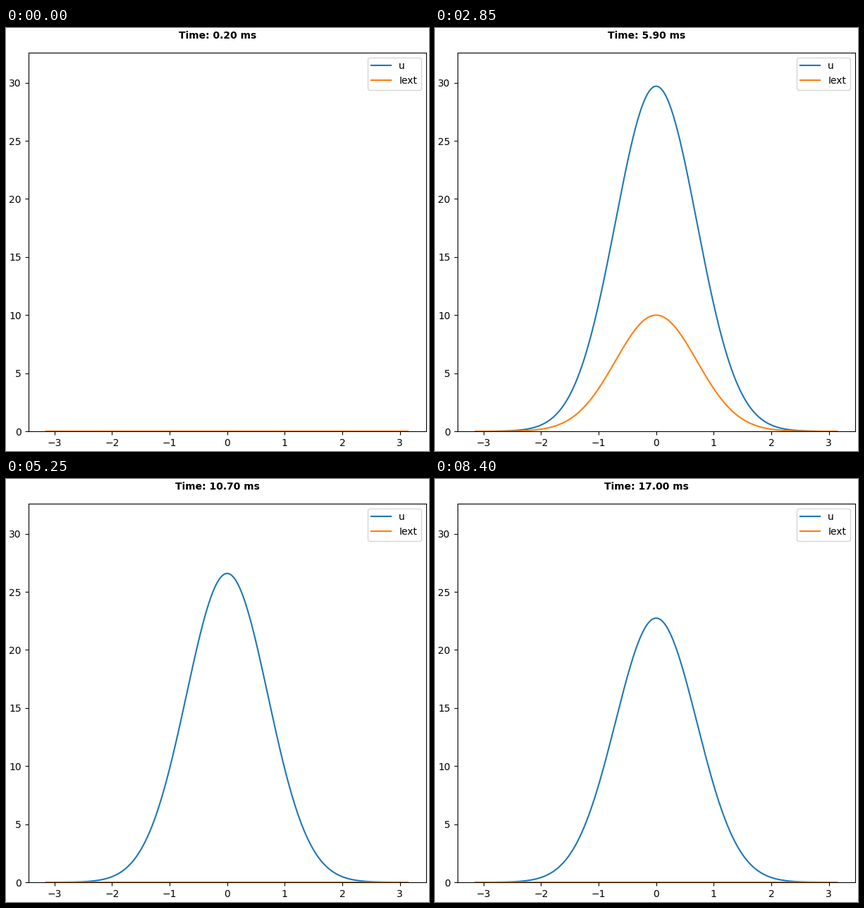
Recreate the animation shown at these times as a matplotlib script. Size 600 by 600 pixels, loop 8.45 s.

```python
import numpy as np
import matplotlib.pyplot as plt
from matplotlib.animation import FuncAnimation

# Ring attractor network: bump driven by a transient Gaussian input
N, TAU, K, WIDTH, AMP, J0 = 512, 2.0, 0.1, 0.5, 10.0, 4.0
DT, SUBSTEPS = 0.1, 4
ON, OFF, STEPS = 10, 90, 170
SIZE, PAD = 6, 1 / 24  # inches

x = np.linspace(-np.pi, np.pi, N)


def ring_dist(d):
    return (d + np.pi) % (2 * np.pi) - np.pi


conn = J0 * np.exp(-0.5 * (ring_dist(x - x[:, None]) / WIDTH) ** 2)
conn /= np.sqrt(2 * np.pi) * WIDTH
bump = AMP * np.exp(-0.25 * (ring_dist(x) / WIDTH) ** 2)


def slope(u, inp):
    sq = u ** 2
    rate = sq / (1 + K * sq.sum())
    return (-u + conn @ rate + inp) / TAU


def rk4(u, inp, h):
    k1 = slope(u, inp)
    k2 = slope(u + h / 2 * k1, inp)
    k3 = slope(u + h / 2 * k2, inp)
    k4 = slope(u + h * k3, inp)
    return u + h / 6 * (k1 + 2 * k2 + 2 * k3 + k4)


def simulate():
    u = np.zeros(N)
    us, inputs = [], []
    for step in range(STEPS):
        inp = bump if ON <= step < OFF else np.zeros(N)
        for _ in range(SUBSTEPS):
            u = rk4(u, inp, DT / SUBSTEPS)
        us.append(u)
        inputs.append(inp)
    return np.array(us), np.array(inputs)


us, inputs = simulate()

fig = plt.figure(figsize=(SIZE, SIZE), dpi=100, layout="constrained")
# Extra gap of two pads between the title and the axes
fig.get_layout_engine().set(w_pad=PAD, h_pad=PAD,
                            rect=(0, 0, 1, 1 - 2 * PAD / SIZE))
ax = fig.add_subplot()
u_line, = ax.plot(x, us[1], label="u")
inp_line, = ax.plot(x, inputs[1], label="Iext")
ax.set_ylim(0, us.max() * 1.02)
ax.legend(loc="upper right")
title = fig.suptitle("Time: 0.20 ms", fontsize=10, fontweight="bold")


def update(i):
    step = i + 1
    u_line.set_ydata(us[step])
    inp_line.set_ydata(inputs[step])
    title.set_text(f"Time: {(step + 1) * DT:.2f} ms")
    return u_line, inp_line, title


anim = FuncAnimation(fig, update, frames=STEPS - 1, interval=50,
                     repeat=True, repeat_delay=0, blit=False)
plt.show()
```
